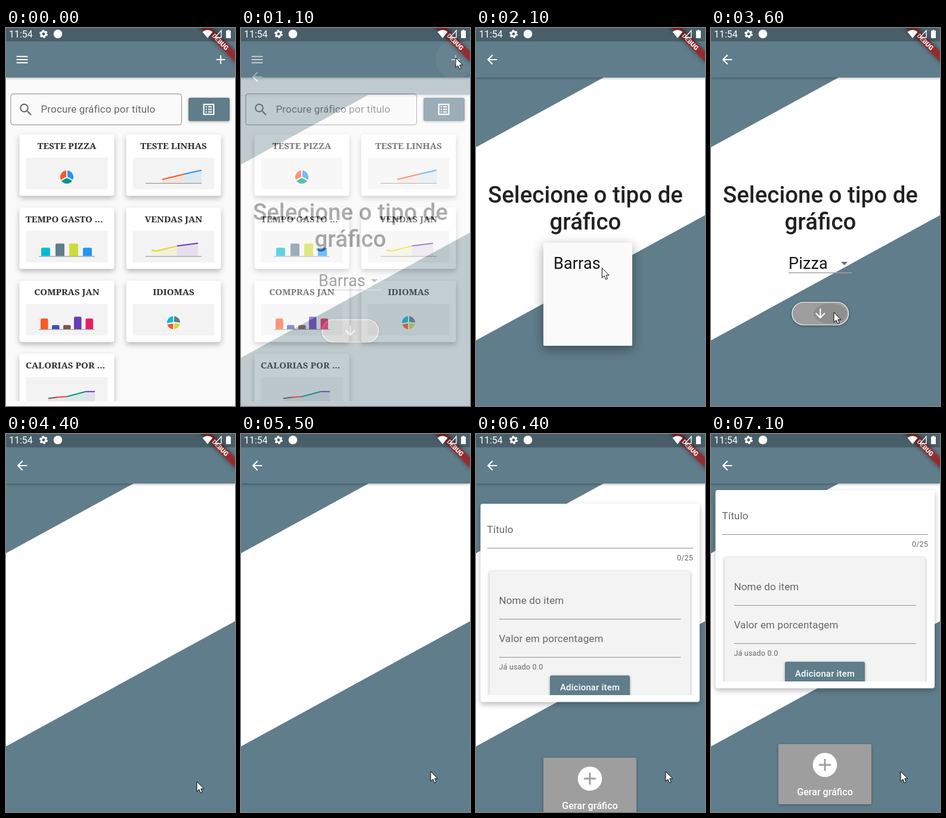
An HTML page that plays this animation: 384 by 634 pixels, repeating every 7200 ms.

```html
<!DOCTYPE html>
<html lang="pt">
<head>
<meta charset="utf-8">
<title>Gráficos</title>
<style>
  html, body { margin: 0; width: 100%; height: 100%; overflow: hidden; background: #fafafa; }
  svg { display: block; width: 384px; height: 634px; font-family: Roboto, sans-serif; }
  .serif { font: 700 15px "Noto Serif", serif; fill: #2b2b2b; }
  .field { font-size: 17px; letter-spacing: .15px; fill: #666; }
  .small { font-size: 12.6px; letter-spacing: .15px; fill: #666; }
  .title { font-size: 38.4px; font-weight: 500; fill: #212121; text-anchor: middle; }
  .option { font-size: 27px; letter-spacing: .15px; fill: #161616; }
  .low { filter: drop-shadow(0 1.5px 2px rgba(0,0,0,.35)); }
  .card { filter: drop-shadow(0 4px 5px rgba(0,0,0,.27)); }
  .high { filter: drop-shadow(0 6px 10px rgba(0,0,0,.38)); }
</style>
</head>
<body>
<svg id="stage" viewBox="0 0 384 634"></svg>
<script>
const LOOP = 7200, STEP = 100;
const SLATE = '#607d8b', PANEL = '#f3f3f3';

const ICONS = {
  menu: 'M3 18h18v-2H3v2zm0-5h18v-2H3v2zm0-7v2h18V6H3z',
  add: 'M19 13h-6v6h-2v-6H5v-2h6V5h2v6h6v2z',
  back: 'M20 11H7.83l5.59-5.59L12 4l-8 8 8 8 1.41-1.41L7.83 13H20v-2z',
  down: 'M20 12l-1.41-1.41L13 16.17V4h-2v12.17l-5.58-5.59L4 12l8 8 8-8z',
  search: 'M15.5 14h-.79l-.28-.27A6.47 6.47 0 0 0 16 9.5 6.5 6.5 0 1 0 9.5 16c1.61 0 3.09-.59 4.23-1.57l.27.28v.79l5 4.99L20.49 19l-4.99-5zm-6 0C7.01 14 5 11.99 5 9.5S7.01 5 9.5 5 14 7.01 14 9.5 11.99 14 9.5 14z',
  list: 'M19 5v14H5V5h14m1.1-2H3.9c-.5 0-.9.4-.9.9v16.2c0 .4.4.9.9.9h16.2c.4 0 .9-.5.9-.9V3.9c0-.5-.5-.9-.9-.9zM11 7h6v2h-6zm0 4h6v2h-6zm0 4h6v2h-6zM7 7h2v2H7zm0 4h2v2H7zm0 4h2v2H7z'
};

const icon = (name, x, y, scale = 1.047, fill = '#fff') =>
  `<path d="${ICONS[name]}" fill="${fill}" transform="translate(${x} ${y}) scale(${scale}) translate(-12 -12)"/>`;
const rect = (x, y, w, h, fill, r = 0, extra = '') =>
  `<rect x="${x}" y="${y}" width="${w}" height="${h}" rx="${r}" fill="${fill}" ${extra}/>`;
const text = (str, x, y, cls, extra = '') =>
  `<text x="${x}" y="${y}" class="${cls}" ${extra}>${str}</text>`;
const rule = (x1, x2, y, color = '#8f8f8f', width = 1) =>
  `<path d="M${x1} ${y}H${x2}" stroke="${color}" stroke-width="${width}"/>`;
const group = (id, body, extra = '') => `<g id="${id}" ${extra}>${body}</g>`;

// Charts use coordinates relative to the top left of their card.
const axis = rule(33, 127, 82.5, '#8a8a8a');

function pie(cx, cy, slices) {
  const at = deg => {
    const a = (deg - 90) * Math.PI / 180;
    return `${cx + 12 * Math.cos(a)} ${cy + 12 * Math.sin(a)}`;
  };
  return slices.map(([from, to, color]) =>
    `<path d="M${cx} ${cy}L${at(from)}A12 12 0 0 1 ${at(to)}Z" fill="${color}" stroke="${PANEL}" stroke-width="2"/>`).join('');
}

const bars = (width, list) => list.map(([x, top, color]) =>
  `<path d="M${x} 82V${top + 2}q0-2 2-2h${width - 4}q2 0 2 2V82Z" fill="${color}"/>`).join('') + axis;

const lines = segments => segments.map(([color, ...pts]) => {
  const path = pts.map(p => p.join(' ')).join('L');
  return `<path d="M${pts[0][0]} 82L${path}V82Z" fill="${color}" opacity=".1"/>
    <path d="M${path}" fill="none" stroke="${color}" stroke-width="2"/>`;
}).join('') + axis;

const CARDS = [
  ['TESTE PIZZA', pie(80, 72, [[0, 120, '#2196f3'], [120, 240, '#009688'], [240, 360, '#ff5722']])],
  ['TESTE LINHAS', lines([['#ff5722', [61, 76], [98, 67]], ['#2196f3', [98, 67], [127, 60.5]]])],
  ['TEMPO GASTO …', bars(15, [[37, 68, '#00bcd4'], [61, 61, SLATE], [84, 61, '#cddc39'], [107, 68, '#2196f3']])],
  ['VENDAS JAN', lines([['#e6d41e', [43, 72], [51, 73.5], [86, 65]], ['#673ab7', [86, 65], [121, 60.5]]])],
  ['COMPRAS JAN', bars(12.5, [[36, 64, '#ff5722'], [55, 75, '#3f51b5'], [74, 75, '#795548'], [92, 61, '#673ab7'], [111.5, 64, '#e91e63']])],
  ['IDIOMAS', pie(80, 71, [[0, 95, SLATE], [95, 180, '#cddc39'], [180, 260, '#ff5722'], [260, 360, '#00bcd4']])],
  ['CALORIAS POR …', lines([['#795548', [49, 75.5], [64, 73.5]], ['#f44336', [64, 73.5], [80, 72.5]],
    ['#009688', [80, 72.5], [112, 64]], ['#673ab7', [112, 64], [127, 64]]])]
];

function card([label, chart], i) {
  const x = 22 + (i % 2) * 179, y = 178 + Math.floor(i / 2) * 122.6;
  const clipped = label.endsWith('…');
  return `<g transform="translate(${x} ${y})">${rect(.5, .5, 159, 103, '#fff', 4, 'class="card"')}
    ${text(label, clipped ? 11 : 80, 25, 'serif', clipped ? '' : 'text-anchor="middle"')}
    ${rect(11.5, 39.5, 137, 53, PANEL)}${chart}</g>`;
}

const appBar = rect(0, -2, 384, 85, SLATE, 0, 'class="low"');

const home = rect(0, 0, 384, 634, '#fafafa') + appBar + icon('menu', 27, 53) + icon('add', 360, 53)
  + group('ripple', '<circle cx="358" cy="53" r="32" fill="#fff" opacity=".08"/>', 'clip-path="url(#barClip)"')
  + rect(8, 110.5, 286.5, 52, 'none', 4, 'stroke="#868686"')
  + icon('search', 33.3, 137, 1.13, '#6b6b6b') + text('Procure gráfico por título', 58.5, 142, 'field')
  + rect(306, 117, 69, 39, SLATE, 3, 'class="low"') + icon('list', 340, 136.5)
  + `<g clip-path="url(#listClip)">${CARDS.map(card).join('')}</g>`;

const chooser = text('Selecione o tipo de', 183.5, 293, 'title') + text('gráfico', 183.5, 338, 'title')
  + text('Barras', 130, 404, 'option', 'id="choice"')
  + '<path d="M218 392.3h11l-5.5 5.6z" fill="#6d6d6d"/>' + rule(130, 236, 410.5, '#a3a3a3', 1.6)
  + rect(136, 460, 94.5, 38, '#9e9e9e', 19, 'stroke="#fff" stroke-width="1.2" class="low"')
  + '<ellipse id="press" cx="200" cy="479" rx="28" ry="17" fill="#000" opacity=".1"/>'
  + icon('down', 183.3, 479);

const menu = rect(113, 360, 149, 173, '#fafafa', 2, 'id="sheet" class="high"')
  + rect(113, 473, 149, 52, '#000', 0, 'id="pick" opacity=".08"')
  + ['Barras', 'Linhas', 'Pizza'].map((s, i) => text(s, 130, 404 + i * 52, 'option', `id="item${i}"`)).join('');

const form = rect(7.5, 94, 367.5, 332.5, '#fff', 4, 'class="card"')
  + text('Título', 18.5, 143, 'field') + rule(18.5, 364, 168.5) + text('0/25', 364, 189, 'small', 'text-anchor="end"')
  + `<g clip-path="url(#formClip)">${rect(22.5, 207, 337, 240, PANEL, 4, 'class="low"')}
    ${text('Nome do item', 38.5, 262, 'field')}${rule(39, 343.5, 287.5)}
    ${text('Valor em porcentagem', 38.5, 325.5, 'field')}${rule(39, 343.5, 351.5)}
    ${text('Já usado 0.0', 38.5, 371.5, 'small')}
    ${rect(124, 382, 134, 40, SLATE, 3, 'class="low"')}
    ${text('Adicionar item', 191, 406.5, '', 'font-size="14.8" font-weight="500" letter-spacing=".25" fill="#fff" text-anchor="middle"')}</g>`
  + rect(113, 520, 156, 101, '#9e9e9e', 2, 'class="low"') + '<circle cx="191" cy="555" r="20.3" fill="#fff"/>'
  + icon('add', 191, 555, 1.42, '#9e9e9e')
  + text('Gerar gráfico', 191, 605.5, '', 'font-size="16.1" font-weight="500" fill="#fff" text-anchor="middle"');

const wizard = rect(0, 0, 384, 640, SLATE) + '<path d="M0 200L214 83H384V314L0 524Z" fill="#fff"/>'
  + `<g clip-path="url(#bodyClip)">${group('chooser', chooser)}${group('form', form)}</g>`
  + appBar + icon('back', 27, 53) + group('menu', menu);

const banner = `<g transform="translate(384.5 -2) rotate(45)">
  ${rect(-46, 29.3, 92, 12.6, 'rgba(183,28,28,.7)', 0, 'style="filter:drop-shadow(0 0 4px rgba(0,0,0,.6))"')}
  <text y="39.4" font-size="10.7" font-weight="900" fill="#fff" text-anchor="middle">DEBUG</text></g>`;

const status = rect(0, 0, 384, 22.5, 'rgba(0,0,0,.25)')
  + text('11:54', 5, 15.7, '', 'font-size="16" fill="#fff"')
  + `<g fill="none" stroke="#fff"><circle cx="63" cy="10" r="3.9" stroke-width="3"/>
    <circle cx="63" cy="10" r="5.8" stroke-width="2.4" stroke-dasharray="3.3 2.77"/>
    <path d="M361 4V16H350.5Z" stroke-width="1.4"/></g>
    <g fill="#fff"><circle cx="87" cy="10" r="7.3"/><path d="M338 17L329.5 6.5Q338 0 346.5 6.5Z"/>
    <path d="M369 4.5h2.5V3h3v1.500h2.500V17h-8z"/></g>`;

const clip = (id, x, y, w, h) => `<clipPath id="${id}">${rect(x, y, w, h, '#000')}</clipPath>`;

document.getElementById('stage').innerHTML =
  `<defs>${clip('barClip', 0, 0, 384, 83)}${clip('listClip', 0, 164, 384, 462)}
    ${clip('bodyClip', 0, 83, 384, 551)}${clip('formClip', 18, 195, 346, 220)}</defs>`
  + group('home', home) + group('wizard', wizard) + banner + status
  + group('cursor', '<path d="M0 0V16.500L3.800 13L6.400 19L9.200 17.800L6.700 12H11.800Z" fill="#fff" stroke="#000" stroke-linejoin="round"/>');

const el = id => document.getElementById(id);
const show = (id, opacity) => {
  el(id).style.opacity = opacity;
  el(id).style.visibility = opacity > 0 ? 'visible' : 'hidden';
};
const shift = (id, x, y) => el(id).setAttribute('transform', `translate(${x} ${y})`);
const smooth = p => p * p * (3 - 2 * p);

// Each row: time, then values; eased between rows.
function track(rows, t, ease = smooth) {
  let i = rows.findIndex(r => r[0] > t);
  if (i < 0) return rows[rows.length - 1].slice(1);
  if (i === 0) return rows[0].slice(1);
  const a = rows[i - 1], b = rows[i], p = ease((t - a[0]) / (b[0] - a[0]));
  return a.slice(1).map((v, k) => v + (b[k + 1] - v) * p);
}

const POINTER = [[100, 383, 320], [800, 361, 52], [1100, 360, 50], [1800, 212, 402], [2300, 211, 403],
  [2600, 206, 494], [3000, 206, 494], [3400, 206, 477], [3700, 206, 477], [4000, 296, 592],
  [4200, 325, 610], [4400, 320, 583], [4800, 318, 566]];
const ENTER = [[1000, 158, 0], [1100, 29, .37], [1200, 3, .83], [1300, 0, 1]];
const SHEET = [[1900, 0, 65], [2000, .8, 90], [2100, 1, 173], [2900, 1, 173], [3000, .45, 173], [3100, 0, 173]];
const linear = p => p;

function draw(t) {
  show('cursor', t >= 100 ? 1 : 0);
  shift('cursor', ...track(POINTER, t));
  show('ripple', t >= 900 && t < 1200 ? 1 : 0);

  const [rise, fade] = track(ENTER, t, linear);
  show('wizard', fade);
  shift('wizard', 0, rise);

  const [sheetFade, height] = track(SHEET, t, linear);
  el('menu').style.opacity = sheetFade;
  el('menu').style.display = sheetFade > 0 ? '' : 'none';
  el('sheet').setAttribute('height', height);
  [1900, 2100, 2200].forEach((start, i) =>
    el('item' + i).style.opacity = Math.min(1, Math.max(0, (t - start) / 150)));
  el('pick').style.opacity = t >= 2800 ? .08 : 0;
  el('choice').textContent = t >= 2900 ? 'Pizza' : 'Barras';

  el('press').style.opacity = t >= 3600 && t < 4000 ? .1 : 0;
  shift('chooser', 0, track([[3600, 0], [4000, -551]], t)[0]);
  el('chooser').style.display = t < 4000 ? '' : 'none';

  const settle = Math.max(0, 1 - (t - 6200) / 600);
  el('form').style.display = t >= 6200 ? '' : 'none';
  shift('form', 0, 63.5 * settle ** 2.5);
}

const start = performance.now();
function tick() {
  const t = (performance.now() - start) % LOOP;
  draw(Math.floor(t / STEP) * STEP);
  requestAnimationFrame(tick);
}
tick();
</script>
</body>
</html>
```
